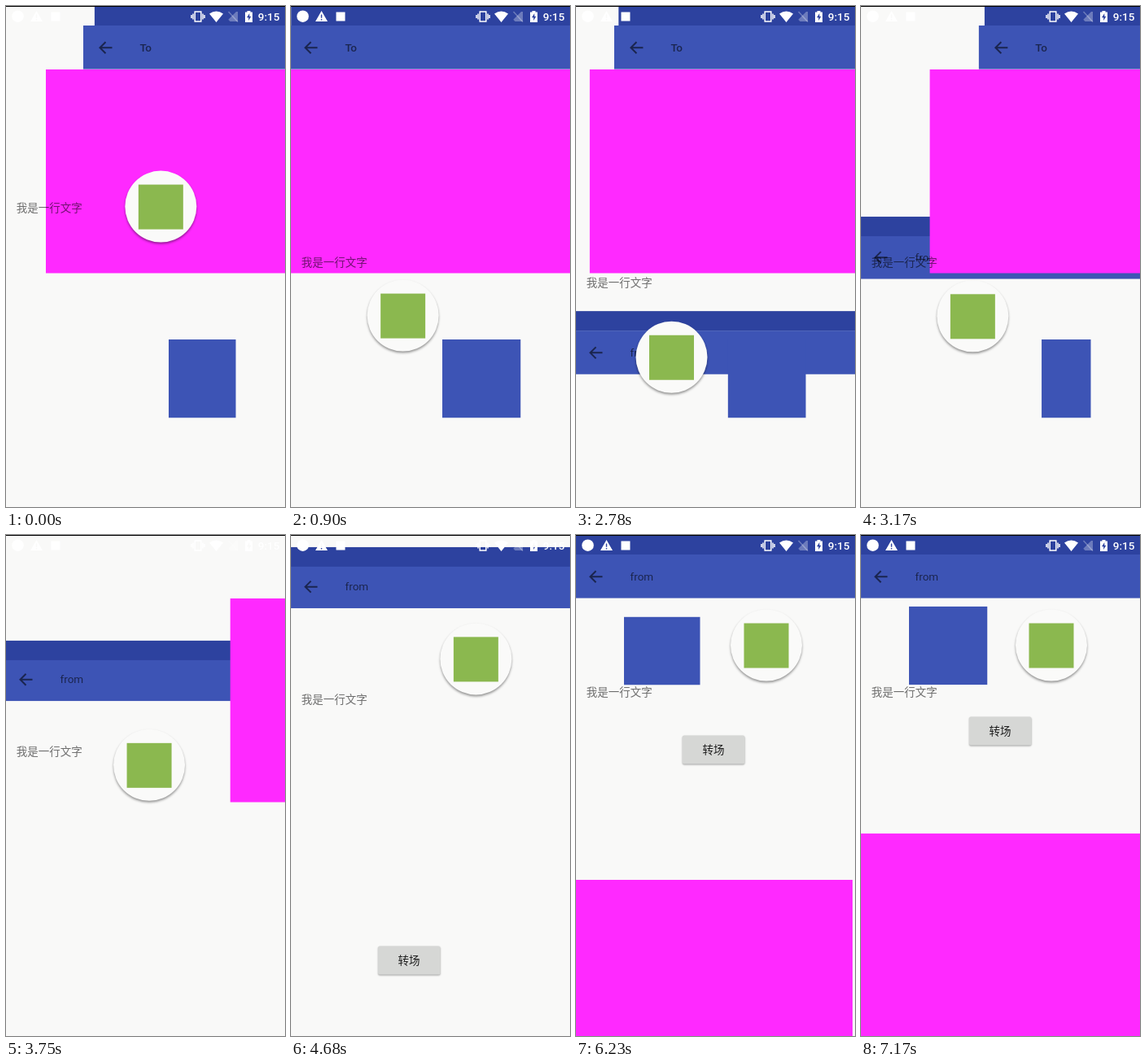
Recreate the animation shown at these times as an HTML page with a canvas. Size 343 px wide and 616 px high, loop 7.57 s.

```html
<!DOCTYPE html>
<html lang="zh-CN">
<head>
<meta charset="utf-8">
<style>
  html, body { margin: 0; width: 100%; height: 100%; overflow: hidden; background: #f9f9f8; }
  canvas { display: block; }
</style>
</head>
<body>
<canvas id="stage" width="343" height="616"></canvas>
<script>
const ctx = document.getElementById('stage').getContext('2d');
const LOOP = 7570, W = 343, H = 616;
const BACK = '#f9f9f8', BLUE = '#3d54b5', NAVY = '#2d429f', PINK = '#ff29ff', INK = 'rgba(0,0,0,.56)';
const LATIN = 'Roboto, sans-serif', HAN = '"Noto Sans CJK SC", "Noto Sans CJK", sans-serif';

// Bursts of motion: first step, last step, number of steps
const bursts = [
  [120, 1050, 8], [1170, 1840, 6], [2240, 3170, 8], [3320, 3750, 4], [3750, 4290, 5],
  [4410, 4680, 3], [4680, 5370, 6], [5520, 6230, 6], [6230, 6480, 3], [6630, 7170, 5]
];

const clamp = x => Math.min(1, Math.max(0, x));
const lerp = (a, b, p) => a + (b - a) * p;
const ease = x => (1 - Math.cos(Math.PI * clamp(x))) / 2;

function stepTime(t) {
  const burst = bursts.filter(b => b[0] <= t).pop();
  if (!burst) return 0;
  const [start, end, count] = burst, gap = (end - start) / (count - 1);
  return start + gap * Math.min(count - 1, Math.floor((t - start) / gap));
}

function box(x, y, w, h, fill) {
  ctx.fillStyle = fill;
  ctx.fillRect(x, y, w, h);
}

function label(str, x, y, fill, family, weight = 400) {
  ctx.font = `${weight} 13.5px ${family}`;
  ctx.fillStyle = fill;
  ctx.fillText(str, x, y);
}

function shadow(dy, blur, alpha) {
  ctx.shadowOffsetY = dy;
  ctx.shadowBlur = blur;
  ctx.shadowColor = `rgba(0,0,0,${alpha})`;
}

// Draws shifted content, optionally cut to a fixed rectangle
function shifted(dx, dy, draw, cut) {
  ctx.save();
  if (cut) {
    ctx.beginPath();
    ctx.rect(...cut);
    ctx.clip();
  }
  ctx.translate(dx, dy);
  draw();
  ctx.restore();
}

function toolbar(title, weight) {
  box(-3, 24, W + 3, 53.6, BLUE);
  ctx.strokeStyle = INK;
  ctx.lineWidth = 2;
  ctx.stroke(new Path2D('M32.5 51.2H18M24.5 44.2L17.5 51.2L24.5 58.2'));
  label(title, 66.5, 56, INK, LATIN, weight);
}

function clippedSquare(x, y, dx, dy) {
  shifted(dx, dy, () => box(x, y, 96.5, 96.5, BLUE), [x, y, 96.5, 96.5]);
}

function toScreen(t) {
  const slide = (inEnd, outStart) =>
    W * ((Math.max(0, inEnd - t) / 1450) ** 2 + (Math.max(0, t - outStart) / 1450) ** 2);
  shifted(slide(775, 2218), 0, () => toolbar('To', 500));
  shifted(slide(817, 2205), 0, () => box(0, 0, W, 24, NAVY));
  shifted(slide(548, 2450), 0, () => box(0, 78, W, 250.5, PINK));
  clippedSquare(186, 410, slide(293, 2700), 0);
}

function button() {
  ctx.save();
  shadow(1, 2, .35);
  ctx.fillStyle = '#d6d7d5';
  ctx.beginPath();
  ctx.roundRect(133, 223.5, 76.5, 35, 2);
  ctx.fill();
  ctx.restore();
  label('转场', 157.5, 246, 'rgba(0,0,0,.87)', HAN);
}

function fromBars(rise) {
  const bar = rise(5105, .0083), status = Math.max(bar, rise(5157, .0081));
  shifted(0, bar, () => toolbar('from', 400));
  shifted(0, status, () => box(0, 0, W, 24, NAVY));
}

function fromBody(rise) {
  const square = rise(6692, .0078), btn = rise(6850, .00774), panel = rise(7198, .0078);
  clippedSquare(59, 87.8, -.23 * square, square);
  shifted(-.092 * btn, btn, button);
  shifted(-.053 * panel, panel, () => box(0, 367, W, 249, PINK));
}

function sharedParts(t) {
  const p = t < 2240 ? ease((t + 1141) / 2860) : 1 - ease((t - 2240) / 2860);
  label('我是一行文字', 12.7, lerp(198.3, 358.3, p), INK, HAN);
  const x = lerp(234, 107, p), y = lerp(135.5, 458.5, p);
  ctx.save();
  shadow(2, 3, .4);
  ctx.fillStyle = '#fafaf9';
  ctx.beginPath();
  ctx.arc(x, y, 44, 0, 7);
  ctx.fill();
  ctx.restore();
  box(x - 27.5, y - 27, 55, 55, '#8bb84f');
}

// White system icons, only visible where a dark bar lies below
const solidIcons = new Path2D(
  'M37.5 6L45 19H30ZM36.8 10.5H38.2V14.8H36.8ZM36.8 16H38.2V17.5H36.8Z' +
  'M250 9.5Q258.5 3.5 267 9.5L258.5 20Z' +
  'M294 7.5H296.5V6H300.5V7.5H303V20H294ZM299.3 9L296 14.3H298.2V18L301.3 12.7H299.3Z');
const lineIcons = new Path2D('M232.2 7H239.8V19H232.2ZM230 9.5V16.5M228 11V15M242 9.5V16.5M244 11V15');
const noSim = new Path2D('M285 7V19H275.5L273.5 17V16.5L283 7Z');

function systemIcons() {
  ctx.fillStyle = ctx.strokeStyle = '#fff';
  ctx.beginPath();
  ctx.arc(14.5, 12.7, 7.3, 0, 7);
  ctx.fill();
  ctx.fillRect(55.5, 7.5, 11, 11);
  ctx.fill(solidIcons, 'evenodd');
  ctx.lineWidth = 1.5;
  ctx.stroke(lineIcons);
  ctx.globalAlpha = .3;
  ctx.fill(noSim);
  ctx.stroke(new Path2D('M273.5 7L285 19.5'));
  ctx.globalAlpha = 1;
  label('9:15', 309.8, 17.8, '#fff', LATIN, 500);
}

function draw(t) {
  const rise = (end, rate) => (rate * Math.max(0, end - t)) ** 2;
  box(0, 0, W, H, BACK);
  if (t > 2300) fromBars(rise);
  toScreen(t);
  if (t > 2300) fromBody(rise);
  sharedParts(t);
  systemIcons();
  box(0, 0, W, 1, '#000');
}

const begin = performance.now();
function tick() {
  draw(stepTime((performance.now() - begin) % LOOP));
  requestAnimationFrame(tick);
}
tick();
</script>
</body>
</html>
```
